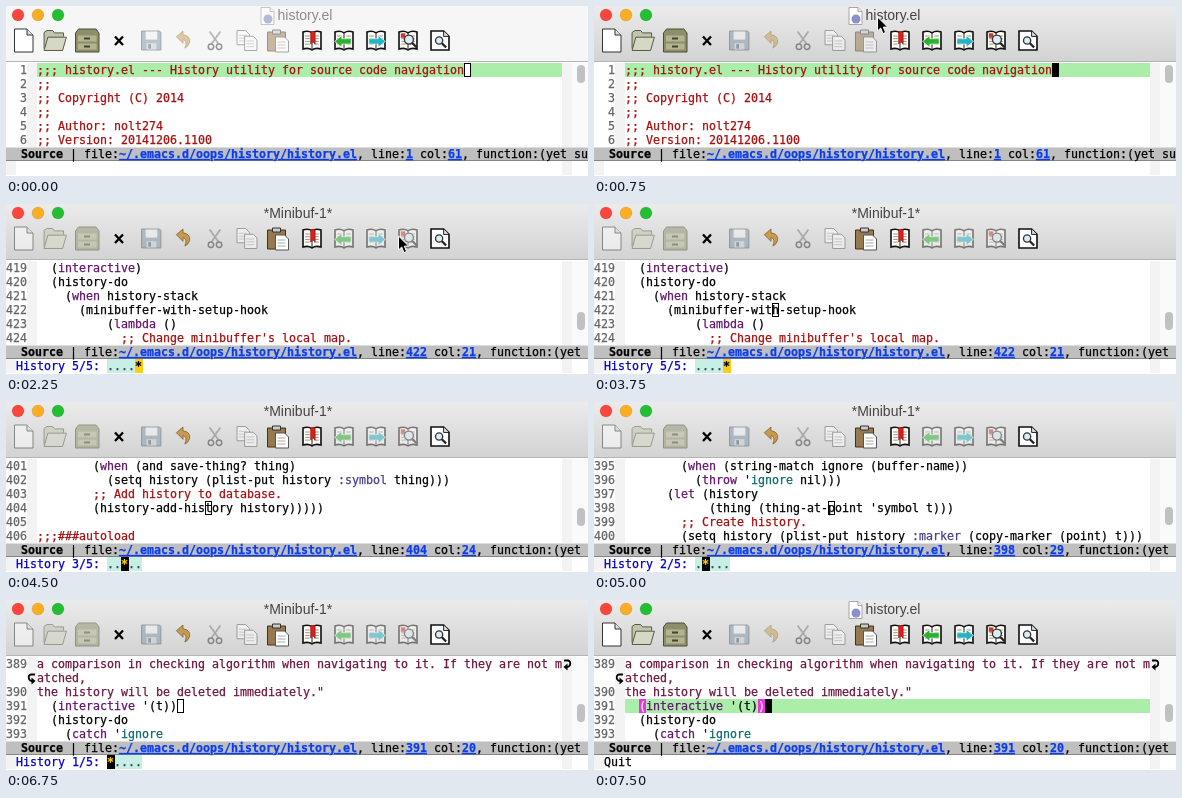
An HTML page for the animation above (8 s loop, 582 by 170 pixels).

```html
<!DOCTYPE html>
<html lang="en">
<head>
<meta charset="utf-8">
<title>history.el</title>
<style>
  html, body { margin: 0; width: 100%; height: 100%; overflow: hidden; background: #fff; }
  svg { display: block; }
  text { white-space: pre; }
  .mono {
    font: 11.63px "DejaVu Sans Mono", "Liberation Mono", monospace;
    fill: currentColor; stroke: currentColor; stroke-width: .25;
  }
  .title { font: 14px "Liberation Sans", Arial, sans-serif; text-anchor: middle; }
  .link { color: #0a3cf0; font-weight: bold; text-decoration: underline; }
</style>
</head>
<body>
<svg width="582" height="170" viewBox="0 0 582 170">
  <defs>
    <linearGradient id="chrome" x2="0" y2="1">
      <stop stop-color="#ebebeb"/><stop offset="1" stop-color="#d3d3d3"/>
    </linearGradient>
  </defs>
  <rect width="582" height="170" fill="#fff"/>
  <rect id="bar" width="582" height="55"/>
  <rect y="55" width="582" height="1" fill="#b4b4b4"/>
  <g id="lights"></g>
  <g id="proxy">
    <path d="M255 1.5h9l4 4V18.500h-13z" fill="#fff" stroke="#a5a5ad"/>
    <path d="M264 1.500v4h4" fill="#eee" stroke="#a5a5ad"/>
    <circle cx="262" cy="13" r="4.500" fill="#8d90cc"/>
  </g>
  <text id="title" class="title" y="14"></text>
  <g id="tools"></g>
  <g id="editor"></g>
  <path id="pointer" d="M1.500 1v14l3.200-3 2.300 5.600 2.600-1.100-2.300-5.400h4.400z" fill="#000" stroke="#fff"/>
</svg>
<script>
const LOOP = 8000, CHAR = 7, ROW = 14, TOP = 57, LEFT = 31, RIGHT = 556;
const COMMENT = '#a80f0f', STRING = '#701540', BUILTIN = '#483d8b', KEYWORD = '#64146e', CONSTANT = '#0b6a6a';
const FRINGE = '#f3f3f3';
const $ = id => document.getElementById(id);

const views = {
  header: { first: 1, line: 1, col: 61, row: 0, thumb: 59, text: [
    ';;; history.el --- History utility for source code navigation', ';;',
    ';; Copyright (C) 2014', ';;', ';; Author: nolt274', ';; Version: 20141206.1100'] },
  pick5: { first: 419, line: 422, col: 21, row: 3, thumb: 108, text: [
    '  (interactive)', '  (history-do', '    (when history-stack',
    '      (minibuffer-with-setup-hook', '          (lambda ()',
    "            ;; Change minibuffer's local map."] },
  pick4: { first: 408, line: 411, col: 20, row: 3, thumb: 106, text: [
    '  "Navigate to previous history."', '  (interactive)', '  (history-do',
    '    (history-move -1)))', '', ';;;###autoload'] },
  pick3: { first: 401, line: 404, col: 24, row: 3, thumb: 106, text: [
    '        (when (and save-thing? thing)',
    '          (setq history (plist-put history :symbol thing)))',
    '        ;; Add history to database.', '        (history-add-history history)))))',
    '', ';;;###autoload'] },
  pick2: { first: 395, line: 398, col: 29, row: 3, thumb: 105, text: [
    '        (when (string-match ignore (buffer-name))', "          (throw 'ignore nil)))",
    '      (let (history', "            (thing (thing-at-point 'symbol t)))",
    '        ;; Create history.',
    '        (setq history (plist-put history :marker (copy-marker (point) t)))'] },
  pick1: { first: 389, line: 391, col: 20, row: 3, thumb: 104, docRows: 3, wrapped: 1, text: [
    'a comparison in checking algorithm when navigating to it. If they are not m', 'atched,',
    'the history will be deleted immediately."', "  (interactive '(t))", '  (history-do',
    "    (catch 'ignore"] }
};

// Each step lists what changes at its time; everything else carries over.
const steps = [
  [0, { view: 'header', active: false, cursor: 'hollow', pick: 0, star: false, quit: false,
        pointer: null, pressed: false, undo: false, paste: false, hl: true }],
  [250, { pointer: [300, 19] }],
  [500, { pointer: [282, 10] }],
  [750, { active: true, cursor: 'solid' }],
  [1250, { pointer: [358, 18], cursor: '' }],
  [1500, { pointer: [385, 29] }],
  [1750, { pointer: [391, 31], cursor: 'solid' }],
  [2000, { pressed: true }],
  [2250, { view: 'pick5', pick: 5, cursor: '', pressed: false, undo: true, paste: true, hl: false }],
  [2500, { pointer: null, cursor: 'hollow', star: true }],
  [2750, { star: false }],
  [3250, { star: true }],
  [3750, { star: false }],
  [4000, { view: 'pick4', pick: 4, star: true }],
  [4500, { view: 'pick3', pick: 3 }],
  [5000, { view: 'pick2', pick: 2 }],
  [5500, { star: false }],
  [5750, { view: 'pick1', pick: 1, star: true }],
  [6250, { star: false }],
  [6750, { star: true }],
  [7250, { star: false }],
  [7500, { pick: 0, quit: true, cursor: 'solid', hl: true, undo: false }]
];

const escape = s => s.replace(/&/g, '&amp;').replace(/</g, '&lt;');
const rect = (x, y, w, h, fill, extra = '') =>
  `<rect x="${x}" y="${y}" width="${w}" height="${h}" fill="${fill}" ${extra}/>`;
const path = (d, fill, stroke = '#333', width = 1) =>
  `<path d="${d}" fill="${fill}" stroke="${stroke}" stroke-width="${width}"/>`;
const circle = (x, y, r, fill, stroke = 'none', width = 1) =>
  `<circle cx="${x}" cy="${y}" r="${r}" fill="${fill}" stroke="${stroke}" stroke-width="${width}"/>`;
const mono = (x, top, html, color = '#000') =>
  `<text class="mono" x="${x}" y="${top + 11}" color="${color}">${html}</text>`;

const page = path('M-9.500-11.500H3l6 6V11.500H-9.500z', '#fff') + path('M3-11.500v6h6', '#ddd');
const lens = (x, y, r) =>
  path(`M${x + r * .7} ${y + r * .7}l5 5`, 'none', '#222', 2.500) + circle(x, y, r, '#dcecf5', '#333', 1.500);
const book = path('M-10-9.500Q-4-11.500 0-8.500Q4-11.500 10-9.500V9.500Q4 7.500 0 10.500Q-4 7.500-10 9.500z', '#fffdf5', '#111', 1.800) +
  path('M0-8V10', 'none', '#333', 1.200) +
  path('M-7.500-5h5M-7.500-2h5M-7.500 1h5M-7.500 4h5M2.500-5h5M2.500-2h5M2.500 1h5M2.500 4h5', 'none', '#888');
const arrow = (dir, fill) => `<g transform="scale(${dir} 1)">` +
  path('M-10.500 1l8-6.500v3.500H8v6H-2.500v3.500z', fill, '#fff', .7) + '</g>';
const sheet = (x, y) => path(`M${x} ${y}h9l4 4v11h-13z`, '#fff', '#555') +
  path(`M${x + 2} ${y + 5}h8m-8 3h8m-8 3h8`, 'none', '#aaa');

// Each icon: centre x, scale, artwork.
const icons = {
  open: [18, 1, page],
  folder: [49, .95, path('M-11.500 8.500V-8.500l3-2h6l2 2.500H9v4', '#c2c5ae', '#55533f') +
    path('M-11.500 10.500l4-14H12l-4 14z', '#d4d8c4', '#55533f')],
  cabinet: [81, 1, path('M-11.500-7.500l3-4H9l3 4V11.500H-11.500z', '#8d8f6b', '#4c4d38') +
    rect(-9, -5, 18.500, 6, '#b3b48f') + rect(-9, 3, 18.500, 6, '#b3b48f') +
    rect(-3, -3, 6, 2, '#45432e') + rect(-3, 5, 6, 2, '#45432e')],
  close: [113, 1, path('M-4-4l8 8.500M4-4l-8 8.500', 'none', '#000', 2.300)],
  save: [145, .9, path('M-10.500-10.500h20l1.500 1.500v19.500H-10.500z', '#7f93a6', '#3d4b58') +
    rect(-6, -10, 13, 9, '#f4f4f4') + rect(-5, 3, 11, 7, '#c9d0d6') + rect(-3, 4, 3, 5, '#4b5865')],
  undo: [177, .95, path('M-7-4l7-6v4Q8-5 7 2Q6 6 2 8Q5 0 0-1v4z', '#c79a4f', '#7d5f2e', .8)],
  cut: [209, .9, path('M-6-10L4 4M6-10L-4 4', 'none', '#777', 2) +
    circle(-4.500, 7, 3, 'none', '#333', 1.700) + circle(4.500, 7, 3, 'none', '#333', 1.700)],
  copy: [241, .95, sheet(-10.500, -10.500) + sheet(-2.500, -4.500)],
  paste: [272, 1, path('M-10.500-8.500h18V10.500h-18z', '#96794f', '#47300f') +
    path('M-5.500-10.500h8v4h-8z', '#ccc', '#333') + sheet(-2.500, -3.500)],
  mark: [306, .9, book + path('M-1.500-10v14l2.500-2.500 2.500 2.500V-10z', '#d8211b', '#8e100c', .7)],
  prev: [338, .9, book + arrow(1, '#27b32f')],
  next: [370, .9, book + arrow(-1, '#22b4c4')],
  find: [402, .9, book + path('M-8-8h5v5h-5z', '#c93a30', 'none') + lens(1, -1, 5)],
  look: [434, .9, path('M-10-10.500H4l6 6V10.500H-10z', '#fff', '#111', 1.800) +
    path('M4-10.500v6h6', '#ddd', '#111') + lens(-1, 0, 4)]
};

$('lights').innerHTML = ['#fc453d', '#fdad22', '#22bf33']
  .map((c, i) => circle(12 + 20 * i, 9, 6, c, 'rgba(0,0,0,.15)', .6)).join('');
$('tools').innerHTML = Object.entries(icons)
  .map(([id, [x, scale, art]]) => `<g id="${id}" transform="translate(${x} 34.500) scale(${scale})">${art}</g>`).join('');

function colourOf(view, line, row) {
  if (/^\s*;/.test(line)) return COMMENT;
  return row < view.docRows || /^\s*"/.test(line) ? STRING : '#000';
}

function highlight(line) {
  const tint = color => `$1<tspan color="${color}">$2</tspan>`;
  return escape(line)
    .replace(/( )(:\w+)/g, tint(BUILTIN))
    .replace(/(\()(interactive|when|lambda|let|catch|throw)\b/g, tint(KEYWORD))
    .replace(/(')(ignore)/g, tint(CONSTANT));
}

function wrapMark(x, y, dir) {
  return `<g transform="translate(${x} ${y}) scale(${dir} 1)">` +
    path('M-3-3.500H1Q4-3 3 1Q2 3 0 3', 'none', '#000', 1.800) +
    path('M-3.500 3l4-3.500v7z', '#000', 'none') + '</g>';
}

function drawBuffer(state, view) {
  const cursorX = LEFT + view.col * CHAR, rowTop = TOP + view.row * ROW;
  let out = rect(21, TOP, 10, 84, FRINGE) + rect(RIGHT, TOP, 10, 84, FRINGE) +
    rect(566, TOP, 16, 84, '#fafafa') + rect(571, view.thumb, 8, 18, '#c1c1c1', 'rx="4"');
  if (state.hl) out += rect(LEFT, rowTop, RIGHT - LEFT, ROW, '#aaeeaa');
  if (state.cursor === 'hollow')
    out += rect(cursorX + .5, rowTop + .5, CHAR - 1, ROW - 1, '#fff', 'stroke="#000"');
  if (state.cursor === 'solid') out += rect(cursorX, rowTop, CHAR, ROW, '#000');

  let number = view.first;
  view.text.forEach((line, row) => {
    const y = TOP + row * ROW;
    if (row !== view.wrapped) out += mono(0, y, String(number++).padStart(3), '#666');
    out += mono(LEFT, y, highlight(line), colourOf(view, line, row));
  });
  if (view.wrapped) {
    const y = TOP + view.wrapped * ROW;
    out += wrapMark(RIGHT + 5, y - 7, 1) + wrapMark(26, y + 7, -1);
  }
  if (state.quit) {
    for (const [col, paren] of [[2, '('], [19, ')']]) {
      const x = LEFT + col * CHAR;
      out += rect(x, rowTop, CHAR, ROW, '#f032e6') + mono(x, rowTop, paren, '#fff');
    }
  }
  return out;
}

function drawStatus(view) {
  const link = s => `<tspan class="link">${s}</tspan>`;
  return rect(0, 141, 582, 14, '#bfbfbf') + rect(0, 141, 582, 1, '#dedede') + rect(0, 154, 582, 1, '#858585') +
    mono(1, 141, '  <tspan font-weight="bold">Source</tspan> | file:' + link('~/.emacs.d/oops/history/history.el') +
      `, line:${link(view.line)} col:${link(view.col)}, function:(yet su`);
}

function drawMinibuffer({ pick, star, quit }) {
  const fringes = rect(0, 155, 10, ROW, FRINGE) + rect(RIGHT, 155, 10, ROW, FRINGE);
  if (quit) return fringes + mono(10, 155, 'Quit');
  if (!pick) return fringes;
  const x = 101, starX = x + (pick - 1) * CHAR;
  return fringes + mono(10, 155, `History ${pick}/5:`, '#0000cd') +
    rect(x, 155, 5 * CHAR, ROW, '#c8efe6') + rect(starX, 155, CHAR + 1, ROW, star ? '#000' : '#ffcc11') +
    mono(x, 155, '.'.repeat(pick - 1) + ' ' + '.'.repeat(5 - pick), '#345') +
    mono(starX, 155, '<tspan font-weight="bold">*</tspan>', star ? '#ffcc11' : '#000');
}

function drawChrome(state) {
  const { active, pick, pointer } = state;
  $('bar').setAttribute('fill', active ? 'url(#chrome)' : '#f6f6f6');
  $('proxy').style.display = pick ? 'none' : '';
  $('proxy').style.opacity = active ? 1 : .6;
  $('title').textContent = pick ? '*Minibuf-1*' : 'history.el';
  $('title').setAttribute('x', pick ? 292 : 299);
  $('title').setAttribute('fill', active ? '#444' : '#8c8c8c');
  const enable = (on, ...ids) => ids.forEach(id => { $(id).style.opacity = on ? 1 : .5; });
  enable(false, 'save', 'cut', 'copy');
  enable(state.undo, 'undo');
  enable(state.paste, 'paste');
  enable(!pick, 'open', 'folder', 'cabinet', 'prev', 'next', 'find');
  $('find').style.filter = state.pressed ? 'brightness(.65)' : 'none';
  $('pointer').style.display = pointer ? '' : 'none';
  if (pointer) $('pointer').setAttribute('transform', `translate(${pointer})`);
}

let shown = -1;
function render(time) {
  const now = time % LOOP;
  const count = steps.filter(([at]) => at <= now).length;
  if (count !== shown) {
    shown = count;
    const state = Object.assign({}, ...steps.slice(0, count).map(step => step[1]));
    const view = views[state.view];
    drawChrome(state);
    $('editor').innerHTML = drawBuffer(state, view) + drawStatus(view) + drawMinibuffer(state);
  }
}

const start = performance.now();
function tick() {
  render(performance.now() - start);
  requestAnimationFrame(tick);
}
tick();
</script>
</body>
</html>
```
